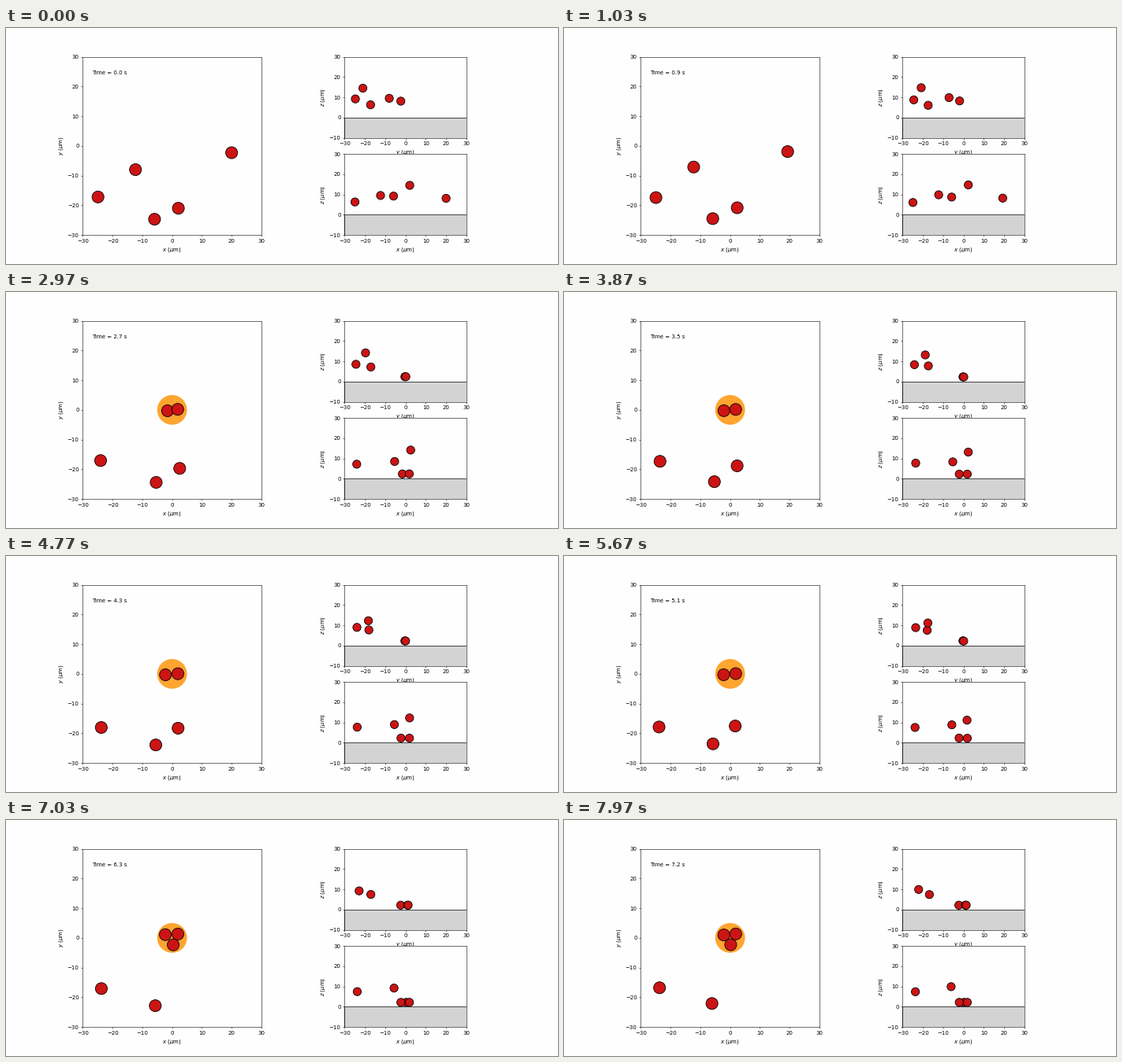
Recreate the animation shown at these times as a matplotlib script. Size 700x300 px, loop 8000 ms.

```python
import numpy as np
import matplotlib.pyplot as plt
from matplotlib.animation import FuncAnimation
from matplotlib.patches import Circle, Rectangle

W, H, DPI = 700, 300, 50
FRAMES, LOOP_MS = 240, 8000
DT = 0.03            # simulated seconds per frame
TRAP_ON = 50         # frame at which the trap is switched on
RADIUS, TRAP_RADIUS = 2.0, 5.0
STEP = 0.06          # size of one random step in micrometres
FLOOR = 2.15         # height of a trapped ball above the ground

PAPER, BALL, TRAP, GROUND = "#fefefe", "#cc1414", "#ffa530", "lightgray"

# Start, end of the free drift, and (for caught balls) first and last frame
# of the pull into the trap.
BALLS = [
    ((-24.9, -17.2, 6.3), (-23.7, -16.8, 7.4), None),
    ((-5.9, -24.7, 9.2), (-6.1, -22.1, 9.9), None),
    ((2.1, -21.0, 14.5), (0.85, -17.6, 10.5), (170, 204)),
    ((-12.3, -8.0, 9.5), (-12.0, -6.8, 9.8), (TRAP_ON, 61)),
    ((20.0, -2.3, 8.1), (19.0, -0.8, 8.0), (TRAP_ON, 87)),
]
ARRIVALS = sorted(pull[1] for _, _, pull in BALLS if pull)


def ramp(f, start, end):
    return np.clip((f - start) / (end - start), 0, 1)[:, None]


def jitter(rng):
    """Random walk that starts and ends at zero."""
    walk = rng.normal(0, STEP, (FRAMES, 3)).cumsum(axis=0)
    s = np.linspace(0, 1, FRAMES)[:, None]
    return walk - walk[0] * (1 - s) - walk[-1] * s


def slot(k, j):
    """Place of ball j in a ring of k touching balls."""
    r = RADIUS / np.sin(np.pi / k) if k > 1 else 0
    a = np.radians(260 - 35 * k - 360 * j / k)
    return np.array([r * np.cos(a), r * np.sin(a), FLOOR])


def resting(f, j):
    """Trapped ball j, making room for each later arrival."""
    pos = slot(j + 1, j)
    for k in range(j + 2, len(ARRIVALS) + 1):
        t = ARRIVALS[k - 1]
        pos = pos + (slot(k, j) - pos) * ramp(f, t - 4, t + 4)
    return pos


def trajectory(start, end, pull, rng):
    f = np.arange(FRAMES)
    start, end = np.array(start), np.array(end)
    drift = ramp(f, 0, pull[0] if pull else FRAMES - 1) ** 1.5
    pos = start + (end - start) * drift
    noise = jitter(rng)
    if pull:
        s = 1 - (1 - ramp(f, *pull)) ** 0.25     # attraction grows as 1 / r^3
        pos += s * (resting(f, ARRIVALS.index(pull[1])) - pos)
        noise *= 1 - 0.7 * s
    pos += noise
    pos[:, 2] = np.maximum(pos[:, 2], RADIUS + 0.05)
    return pos


def panel(left, bottom, width, height, ymin, xname, yname):
    ax = fig.add_axes([left / W, bottom / H, width / W, height / H],
                      facecolor=PAPER)
    ax.set(xlim=(-30, 30), ylim=(ymin, 30),
           xticks=range(-30, 31, 10), yticks=range(ymin, 31, 10))
    ax.set_xlabel(rf"${xname}$ ($\mu$m)")
    ax.set_ylabel(rf"${yname}$ ($\mu$m)")
    return ax


def add_balls(ax):
    return [ax.add_patch(Circle((0, 0), RADIUS, fc=BALL, ec="black", lw=1.2,
                                zorder=3 + 0.01 * k))
            for k in range(len(BALLS))]


rng = np.random.default_rng(4)
tracks = [trajectory(*ball, rng) for ball in BALLS]

plt.rcParams.update({"font.family": "DejaVu Sans", "font.size": 10})
fig = plt.figure(figsize=(W / DPI, H / DPI), dpi=DPI, facecolor=PAPER)

SIZE, BASE = 226.5, 36.9
SMALL = SIZE / 2.2
top_view = panel(97.4, BASE, SIZE, SIZE, -30, "x", "y")
side_y = panel(429.4, BASE + 1.2 * SMALL, 1.5 * SMALL, SMALL, -10, "y", "z")
side_x = panel(429.4, BASE, 1.5 * SMALL, SMALL, -10, "x", "z")

for ax in (side_y, side_x):
    ax.add_patch(Rectangle((-30, -10), 60, 10, fc=GROUND, ec="black", lw=1))

trap = top_view.add_patch(Circle((0, 0), TRAP_RADIUS, fc=TRAP, ec="none"))
clock = top_view.text(-27, 24, "")

# Each view shows two of the three coordinates.
views = [(add_balls(top_view), [0, 1]),
         (add_balls(side_y), [1, 2]),
         (add_balls(side_x), [0, 2])]


def update(i):
    trap.set_visible(i >= TRAP_ON)
    clock.set_text(f"Time = {DT * i:.1f} s")
    for balls, axes in views:
        for ball, track in zip(balls, tracks):
            ball.center = track[i, axes]
    return [trap, clock] + [b for balls, _ in views for b in balls]


anim = FuncAnimation(fig, update, frames=FRAMES, interval=LOOP_MS / FRAMES,
                     init_func=lambda: update(0), repeat=True, repeat_delay=0)
plt.show()
```
